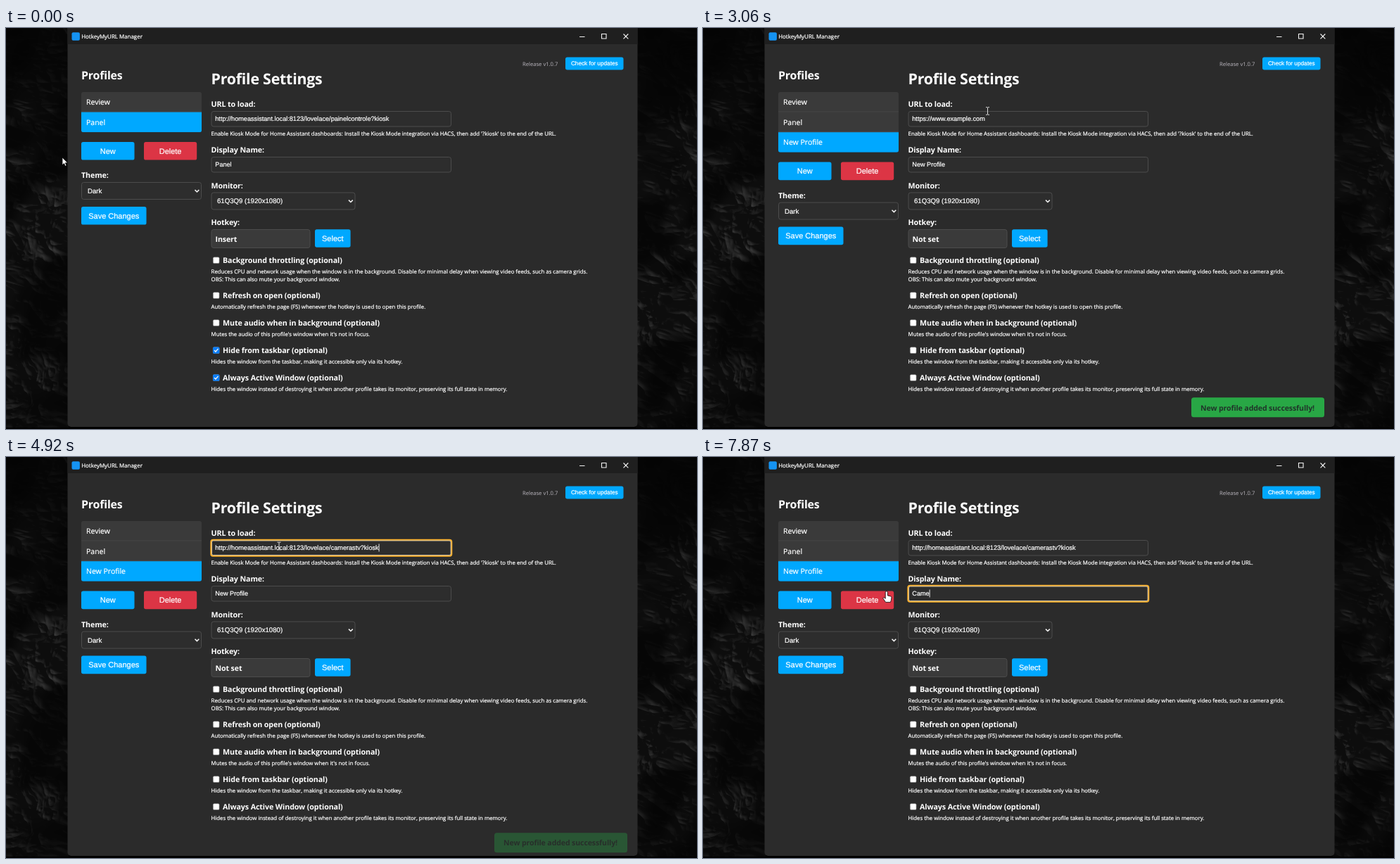
Animation of 982 by 570 pixels, one loop 8000 ms. Source, as an HTML page with a canvas:

```html
<!DOCTYPE html>
<html lang="en">
<head>
<meta charset="utf-8">
<title>Hotkey manager</title>
<style>
html, body { margin: 0; width: 100%; height: 100%; overflow: hidden; background: #000; }
canvas, svg { position: absolute; left: 0; top: 0; width: 982px; height: 570px; display: block; }
text { text-rendering: geometricPrecision; white-space: pre; fill: #fff; stroke: #fff; stroke-width: .22px; }
.ui { font-family: "Open Sans", "Noto Sans", sans-serif; }
.bold { font-family: "Open Sans", "Noto Sans", sans-serif; font-weight: 700; letter-spacing: -.01em; stroke: none; }
.form { font-family: "Liberation Sans", Arial, sans-serif; }
.mid { text-anchor: middle; }
</style>
</head>
<body>
<canvas id="wall" width="982" height="570"></canvas>
<svg id="ui" viewBox="0 0 982 570" xmlns="http://www.w3.org/2000/svg"></svg>
<script>
const LOOP = 8000;
const BLUE = '#00a8ff', PRESSED = '#0496e6', RED = '#dc3545';
const LABEL = 10.7, HINT = 7.81, FIELD = 9.14, BUTTON = 10.97, ITEM = 10.5;
const ROW = 28.6;

const clamp = v => Math.max(0, Math.min(1, v));
const smooth = v => { v = clamp(v); return v * v * (3 - 2 * v); };
const mix = (a, b, k) => a + (b - a) * k;
const $ = id => document.getElementById(id);

// Wallpaper: ridged noise lit from the upper right, broken into dark and lit patches
function paintWall() {
  const ctx = $('wall').getContext('2d');
  ctx.fillRect(0, 0, 982, 570);
  const hash = (x, y) => {
    const s = Math.sin(x * 127.1 + y * 311.7) * 43758.5453;
    return s - Math.floor(s);
  };
  const noise = (x, y) => {
    const i = Math.floor(x), j = Math.floor(y), u = smooth(x - i), v = smooth(y - j);
    return mix(mix(hash(i, j), hash(i + 1, j), u), mix(hash(i, j + 1), hash(i + 1, j + 1), u), v);
  };
  const height = (x, y) => {
    let px = x / 58 + y / 110, py = y / 40 - x / 120, amp = 1, sum = 0;
    px += noise(py, px + 9) * .9;
    for (let o = 0; o < 4; o++) {
      sum += amp * (1 - Math.abs(2 * noise(px, py) - 1));
      [px, py] = [px * 1.6 + py * .9 + 5, py * 1.6 - px * .9 + 3];
      amp *= .5;
    }
    return sum;
  };
  const strip = (x0, w) => {
    const img = ctx.createImageData(w, 570);
    for (let y = 0, p = 0; y < 570; y++) {
      const env = .25 + .75 * smooth((y - 40) / 130) * (1 - .5 * smooth((y - 440) / 110));
      for (let x = 0; x < w; x++, p += 4) {
        const wx = x + x0;
        const slope = height(wx, y) - height(wx + 1.2, y - 1.2);
        const patch = .25 + 1.1 * smooth(noise(wx / 34 + y / 90, y / 38) * 1.7 - .35);
        const g = 4 + env * patch * Math.min(50, 7 + Math.max(0, slope) * 190);
        img.data[p] = img.data[p + 1] = img.data[p + 2] = g;
        img.data[p + 3] = 255;
      }
    }
    ctx.putImageData(img, x0, 0);
  };
  strip(0, 89);
  strip(895, 87);
  ctx.fillRect(0, 568, 982, 2);
}

// Markup helpers; cy is the middle of the capitals
const text = (x, cy, size, str, cls, more = '') =>
  `<text x="${x}" y="${cy + size * .357}" font-size="${size}" class="${cls}" ${more}>${str}</text>`;
const box = (x, y, w, h, fill, r = 0, more = '') =>
  `<rect x="${x}" y="${y}" width="${w}" height="${h}" fill="${fill}" rx="${r}" ${more}/>`;
const line = (d, width, more = '') =>
  `<path d="${d}" fill="none" stroke="#f4f4f4" stroke-width="${width}" ${more}/>`;
const button = (x, y, w, h, fill, str, size = BUTTON, id = '') =>
  `<g id="${id}">` + box(x, y, w, h, fill, 2.7) + text(x + w / 2, y + h / 2, size, str, 'form mid') + '</g>';
const bordered = (x, y, w, h, fill) => box(x + .5, y + .5, w - 1, h - 1, fill, 3, 'stroke="#4c4c4c"');
const select = (x, y, w, h, tx, str) =>
  bordered(x, y, w, h, '#2d2d2d') + text(tx, y + h / 2, 9.65, str, 'form') +
  line(`M${x + w - 9.5} ${y + h / 2 - 1.4}l2.9 2.9 2.9-2.9`, 1.5);
const label = (x, cy, str) => text(x, cy, LABEL, str, 'bold');
const hint = (cy, str) => text(291.6, cy, HINT, str, 'ui');
const field = (id, y) =>
  `<g id="${id}">` + bordered(291.5, y, 341.5, 22.5, '#2d2d2d') +
  box(297.5, y + 4.8, 0, 12.5, '#164c9f', 0, 'class="sel"') +
  text(297.3, y + 11, FIELD, '', 'form') +
  box(0, y + 5.5, .9, 11, '#fff', 0, 'class="caret"') +
  '<g class="ring">' + box(291.3, y - .2, 342, 22.9, 'none', 3, 'stroke="#f9b02c" stroke-width="2"') +
  box(292.5, y + 1, 339.6, 20.5, 'none', 2, 'stroke="#fff3d6" stroke-width=".7"') + '</g></g>';
const check = (id, cy, str) =>
  box(294.3, cy - 4.8, 8.8, 8.8, '#fff', 1.5, 'stroke="#777" stroke-width=".6"') +
  `<g id="${id}">` + box(294, cy - 5.1, 9.4, 9.4, '#0a7cf5', 1.6) +
  line(`M296 ${cy - .4}l1.9 2 3.6-4.2`, 1.4) + '</g>' + label(308, cy, str);

function build() {
  $('ui').innerHTML =
    '<path d="M87.5 0H897.5V562a5 5 0 0 1-5 5H92.5a5 5 0 0 1-5-5z" fill="#2b2b2b"/>' +
    box(87.5, 0, 810, 23, '#1f1f1f') +
    box(93.5, 6.3, 11.4, 11.4, '#1593f2', 2) +
    text(107.2, 12.2, 7.95, 'HotkeyMyURL Manager', 'ui') +
    line('M815 12.5h7.5M846.5 8.5h6.5v6.5h-6.5zM877.5 8.5l6.8 6.8M884.3 8.5l-6.8 6.8', 1.1) +

    text(107, 67.5, 15.9, 'Profiles', 'bold') +
    text(291.5, 72.3, 21.35, 'Profile Settings', 'bold') +
    text(734, 51, 7.65, 'Release v1.0.7', 'ui', 'style="fill:#bcb8c0;stroke:none"') +
    button(795, 41.5, 82.5, 18, BLUE, 'Check for updates', 8.23) +

    '<clipPath id="round"><rect id="clip" x="107" y="91" width="171" rx="3"/></clipPath>' +
    '<g clip-path="url(#round)">' +
    ['Review', 'Panel', 'New Profile'].map((name, i) => {
      const y = 91 + i * ROW;
      return `<g id="item${i}">` + box(107, y, 171, ROW, '#3a3a3a') +
        box(107, y + ROW - 1, 171, 1, '#4a4a4a') + text(114, y + 14.3, ITEM, name, 'ui') + '</g>';
    }).join('') + '</g>' +
    '<g id="side">' +
    button(107, 162, 75.5, 25.6, BLUE, 'New', BUTTON, 'new') +
    button(196, 162, 75.2, 25.6, RED, 'Delete') +
    label(107, 209.5, 'Theme:') +
    select(107, 219, 171, 25, 116, 'Dark') +
    button(107, 254, 92.5, 25.6, BLUE, 'Save Changes') + '</g>' +

    label(291.5, 108, 'URL to load:') + field('url', 118) +
    hint(150, "Enable Kiosk Mode for Home Assistant dashboards: Install the Kiosk Mode integration via HACS, then add '?kiosk' to the end of the URL.") +
    label(291.5, 173.3, 'Display Name:') + field('name', 183) +
    label(291.5, 223.7, 'Monitor:') + select(291.5, 233.5, 205, 25, 300, '61Q3Q9 (1920x1080)') +
    label(291.5, 276.3, 'Hotkey:') + bordered(291.5, 286, 141, 27, '#3a3a3a') +
    text(297.5, 300, 10.6, '', 'bold', 'id="hotkey"') +
    button(439, 286.2, 50.6, 25.6, BLUE, 'Select') +

    check('c0', 330.6, 'Background throttling (optional)') +
    hint(346.7, 'Reduces CPU and network usage when the window is in the background. Disable for minimal delay when viewing video feeds, such as camera grids.') +
    hint(357.5, 'OBS: This can also mute your background window.') +
    check('c1', 380.5, 'Refresh on open (optional)') +
    hint(396.5, 'Automatically refresh the page (F5) whenever the hotkey is used to open this profile.') +
    check('c2', 419.5, 'Mute audio when in background (optional)') +
    hint(435.5, "Mutes the audio of this profile's window when it's not in focus.") +
    check('c3', 458.5, 'Hide from taskbar (optional)') +
    hint(474.5, 'Hides the window from the taskbar, making it accessible only via its hotkey.') +
    check('c4', 497.5, 'Always Active Window (optional)') +
    hint(513.3, 'Hides the window instead of destroying it when another profile takes its monitor, preserving its full state in memory.') +

    '<g id="toast">' + box(694, 525.3, 189, 28, '#28a745', 3.5) +
    text(707, 539.8, 10.55, 'New profile added successfully!', 'bold', 'style="fill:#20352a"') + '</g>' +

    '<g id="pointer"><circle id="press" r="8.7"/>' +
    '<path id="arrow" d="M0 0V10.8L2.5 8.5 4.2 12.3 6 11.5 4.3 7.8H7.6z" fill="#fff" stroke="#000" stroke-width=".7"/>' +
    '<path id="hand" d="M-.6 1.4a1.6 1.6 0 0 1 3.2 0V6l4 .9c1.2.3 1.6 1 1.5 2.2L7.6 12.6 6.6 15.4H-.2L-3.6 10.4c-.8-1.3.8-2.3 1.8-1.2L-.6 10.3z" fill="#fff" stroke="#000" stroke-width=".8"/>' +
    '<path id="beam" d="M-2.5-5.3H-.6L0-4.8.6-5.3H2.5M0-4.8V4.8M-2.5 5.3H-.6L0 4.8.6 5.3H2.5" fill="none" stroke="#ddd" stroke-width="1"/></g>';
}

// Pointer path: time, x, y
const PATH = [
  [0, 80, 184], [880, 80, 184], [1300, 122.5, 174], [2030, 122.5, 174], [2420, 227, 165],
  [2800, 317, 141], [2850, 317, 141], [3060, 404.5, 118], [3200, 403, 128], [3600, 291, 121],
  [3710, 291, 121], [4060, 215, 117], [4520, 380, 127], [4590, 388, 126.5], [5510, 388, 126.5],
  [5850, 537, 171], [6250, 349, 194], [6390, 349, 194], [6990, 259.8, 191], [LOOP, 259.8, 191]
];
function pointerAt(t) {
  const i = Math.max(1, PATH.findIndex(p => p[0] > t));
  const [t0, x0, y0] = PATH[i - 1], [t1, x1, y1] = PATH[i];
  const k = smooth((t - t0) / (t1 - t0));
  return [mix(x0, x1, k), mix(y0, y1, k)];
}

const show = (el, on) => { el.style.display = on ? '' : 'none'; };
const within = (t, a, b) => t >= a && t < b;

function setField(id, value, focus, selectFrom) {
  const g = $(id), label = g.querySelector('text');
  if (label.textContent !== value) label.textContent = value;
  const end = 297.3 + label.getComputedTextLength();
  const sel = g.querySelector('.sel'), caret = g.querySelector('.caret');
  const from = Math.max(297.3, selectFrom), width = focus ? Math.max(0, end - from) : 0;
  sel.setAttribute('x', from);
  sel.setAttribute('width', width);
  caret.setAttribute('x', end);
  show(caret, focus && !width);
  show(g.querySelector('.ring'), focus);
}

function draw(t) {
  const [x, y] = pointerAt(t);
  const added = t >= 1630;
  const shift = added ? ROW : 0;

  // Profile list and the controls under it
  const inList = x >= 107 && x < 278 && y >= 91 && y < 148.4 + shift;
  for (let i = 0; i < 3; i++) {
    const top = 91 + i * ROW, active = i === (added ? 2 : 1);
    const hover = inList && y >= top && y < top + ROW;
    const [bg, edge] = $('item' + i).querySelectorAll('rect');
    bg.setAttribute('fill', active ? BLUE : hover ? '#454545' : '#3a3a3a');
    show(edge, !active);
    show($('item' + i), i < 2 || added);
  }
  $('clip').setAttribute('height', ROW * 2 + shift);
  $('side').setAttribute('transform', `translate(0 ${shift})`);
  const pressed = within(t, 1440, 1600);
  $('new').setAttribute('transform', `translate(0 ${pressed ? .6 : 0})`);
  $('new').firstChild.setAttribute('fill', pressed ? PRESSED : BLUE);

  // Form
  const url = !added ? 'http://homeassistant.local:8123/lovelace/painelcontrole?kiosk'
    : t < 4590 ? 'https://www.example.com' : 'http://homeassistant.local:8123/lovelace/camerastv?kiosk';
  setField('url', url, within(t, 3200, 6250), t < 3600 ? x : t < 4590 ? 0 : 999);
  const typed = [7260, 7530, 7800, 7870].filter(k => t >= k).length;
  const name = !added ? 'Panel' : typed ? 'Came'.slice(0, typed) : 'New Profile';
  setField('name', name, t >= 6250, typed ? 999 : x);
  $('hotkey').textContent = added ? 'Not set' : 'Insert';
  for (let i = 0; i < 5; i++) show($('c' + i), i > 2 && !added);

  const leave = smooth((t - 4560) / 600);
  $('toast').setAttribute('opacity', clamp((t - 1590) / 100) * (1 - leave));
  $('toast').setAttribute('transform', `translate(0 ${13.7 * leave})`);

  // Pointer
  const overText = x > 292 && x < 633 && (within(y, 117.5, 141) || within(y, 183, 206));
  const overButton = within(y, 162 + shift, 188 + shift) && (within(x, 107, 182) || within(x, 196, 271));
  const kind = overText ? 'beam' : inList || overButton ? 'hand' : 'arrow';
  for (const id of ['arrow', 'hand', 'beam']) show($(id), id === kind);
  $('pointer').setAttribute('transform', `translate(${x} ${y})`);
  const click = within(t, 1440, 1690), drag = within(t, 3200, 3710) || within(t, 6300, 6980);
  show($('press'), click || drag);
  $('press').setAttribute('fill', click ? 'rgba(92,190,84,.88)' : 'rgba(205,185,20,.78)');
}

paintWall();
build();
const start = performance.now();
(function tick() {
  draw((performance.now() - start) % LOOP);
  requestAnimationFrame(tick);
})();
</script>
</body>
</html>
```
